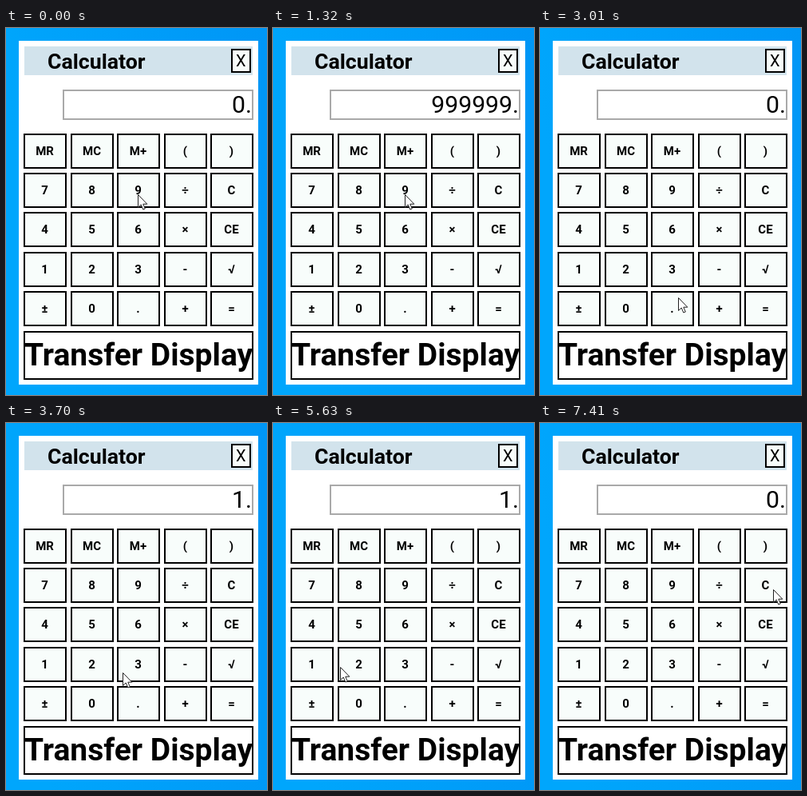
Animation of 327x459 px, one loop 7580 ms. Source, as an HTML page:

```html
<!DOCTYPE html>
<html lang="en">
<head>
<meta charset="utf-8">
<title>Calculator</title>
<style>
  html, body { margin: 0; width: 100%; height: 100%; overflow: hidden; background: #009dfa; }
  svg { display: block; width: 100%; height: 100%; }
  text { font-family: Roboto, Arial, sans-serif; fill: #000; }
  .bold { font-weight: 700; }
  .mid { text-anchor: middle; }
  .key rect { fill: #f8fdfb; stroke: #000; stroke-width: 2; }
  .key.lit rect { fill: #3097bf; }
  .key text { font-size: 15px; font-weight: 700; text-anchor: middle; }
</style>
</head>
<body>
<svg viewBox="0 0 327 459">
  <defs>
    <linearGradient id="sky" x1="0" y1=".2" x2="1" y2="0">
      <stop offset="0" stop-color="#00a6fc"/>
      <stop offset="1" stop-color="#0096f6"/>
    </linearGradient>
  </defs>
  <rect width="327" height="459" fill="url(#sky)"/>
  <rect x="16" y="16" width="300" height="430" fill="#fff"/>
  <rect x="23" y="23" width="286" height="36" fill="#d2e3ec"/>
  <text class="bold" x="52" y="51" font-size="26.67">Calculator</text>
  <rect x="283" y="27" width="23" height="28" fill="#f8fdfb" stroke="#000" stroke-width="2"/>
  <text class="mid" x="294.3" y="48" font-size="20">X</text>
  <rect x="72" y="78" width="237" height="36" fill="#fff" stroke="#a9a9a9" stroke-width="2"/>
  <text id="display" x="308" y="106" font-size="30.2" text-anchor="end">0.</text>
  <g id="keys"></g>
  <rect x="23" y="380" width="286" height="59" fill="#fff" stroke="#000" stroke-width="2"/>
  <text class="bold mid" x="166" y="422" font-size="39">Transfer Display</text>
  <circle id="ring" r="12" fill="#94cf62"/>
  <path id="pointer" d="M.5 .5V16.5L4.2 13L6.8 19L9.3 18L6.8 12.2H11.8Z" fill="#fff" stroke="#222" stroke-width="1"/>
</svg>
<script>
const LOOP = 7580, STEP = 77.3, PRESS = 70;
const $ = id => document.getElementById(id);
const display = $('display'), ring = $('ring'), pointer = $('pointer');

const labels = 'MR MC M+ ( ) 7 8 9 ÷ C 4 5 6 × CE 1 2 3 - √ ± 0 . + ='.split(' ');
$('keys').innerHTML = labels.map((label, i) => {
  const x = Math.round(22 + 58.5 * (i % 5)), y = Math.round(131.6 + 49.3 * Math.floor(i / 5));
  return `<g class="key"><rect x="${x + 1}" y="${y + 1}" width="52" height="42"/>` +
    `<text x="${x + 26.5}" y="${y + 27.3}">${label}</text></g>`;
}).join('');
const keys = Object.fromEntries(labels.map((label, i) => [label, $('keys').children[i]]));

// time, key that lights up (if any), display afterwards
const clicks = [
  [80, '9', '9'], [240, '9', '99'], [460, '9', '999'], [690, '9', '9999'],
  [940, '', '99999'], [1240, '9', '999999'], [1930, '', '9999998'],
  [2700, '+', '0'], [3470, '1', '1'], [4240, '=', '9999999'], [4780, '+', '0'],
  [5410, '1', '1'], [6100, '=', 'ERROR'], [7330, 'C', '0']
];

const easeOut = power => p => 1 - (1 - p) ** power;
const linear = easeOut(1);
const smooth = p => p * p * (3 - 2 * p);

// first step, last step, destination, easing
const start = [165, 207.5];
const moves = [
  [1700, 1860, 104, 205, easeOut(1.5)],
  [2090, 2320, 223, 327, easeOut(1.2)],
  [2400, 2550, 233, 351, easeOut(1.5)],
  [2850, 3400, 44, 308, smooth],
  [3620, 3700, 146, 312, linear],
  [3780, 4170, 286, 348, easeOut(1.8)],
  [4400, 4700, 238, 354.5, smooth],
  [4860, 4930, 117, 314, linear],
  [5010, 5240, 35, 293, easeOut(2)],
  [5560, 6020, 283.5, 355, smooth],
  [6630, 6630, 282, 347, linear],
  [6700, 6860, 300, 215, easeOut(1.3)],
  [7030, 7180, 292, 208, linear]
];

function pointerAt(t) {
  let [x, y] = start;
  for (const [from, to, toX, toY, ease] of moves) {
    if (t < from) break;
    const count = Math.round((to - from) / STEP) + 1;
    const done = Math.min(count, Math.floor((t - from + 8) / STEP) + 1);
    const p = ease(done / count);
    x += (toX - x) * p;
    y += (toY - y) * p;
  }
  return [Math.round(x), Math.round(y)];
}

function draw(t) {
  const [time, key, value] = clicks.findLast(c => c[0] <= t) || [-LOOP, '', '0'];
  const pressed = t - time < PRESS;
  const [x, y] = pointerAt(t);
  display.textContent = value + '.';
  for (const label of labels) keys[label].classList.toggle('lit', pressed && label === key);
  ring.style.display = pressed ? '' : 'none';
  ring.setAttribute('transform', `translate(${x} ${y})`);
  pointer.setAttribute('transform', `translate(${x} ${y})`);
}

const begin = performance.now();
function tick() {
  draw((performance.now() - begin) % LOOP);
  requestAnimationFrame(tick);
}
tick();
</script>
</body>
</html>
```
